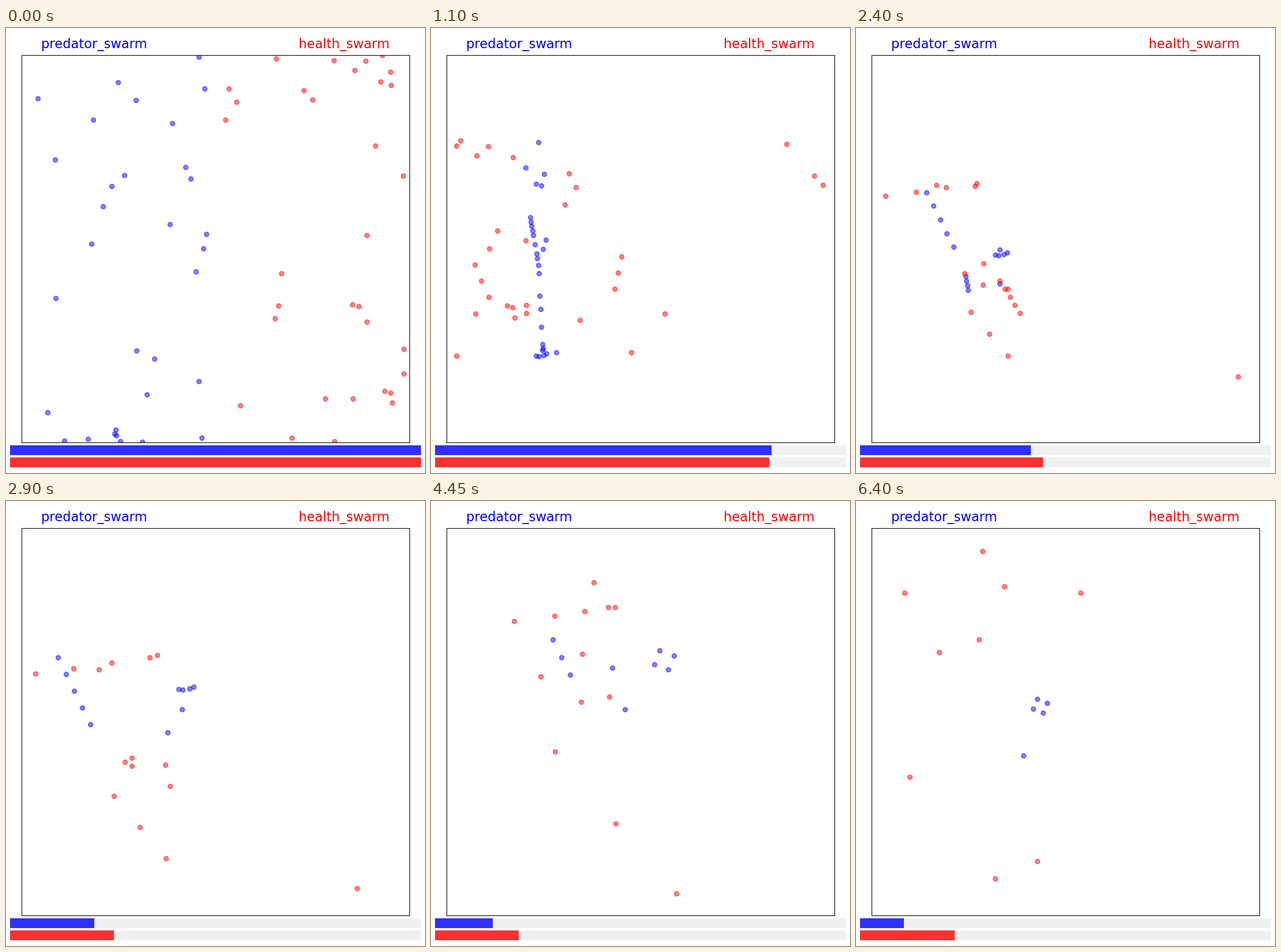
Animation of 726 by 771 pixels, one loop 6.45 s. Source, as a matplotlib script:

```python
import numpy as np
import matplotlib.pyplot as plt
from matplotlib.animation import FuncAnimation
from matplotlib.patches import Rectangle

W, H, DPI = 726, 771, 96
FRAMES, INTERVAL = 129, 50
LEFT, TOP, RIGHT, BOTTOM = 27, 47, 699, 718
ORIGIN = np.array([LEFT, TOP])
SIZE = np.array([RIGHT - LEFT, BOTTOM - TOP])   # opposite walls are joined
VMAX = 6.72                                     # speed limit per axis and step
KEYS = [38, 58, 75, 104, 128]                   # steps of a flock's way points
FOREVER = (FRAMES, FRAMES)


def ring(n, angle):
    a = np.radians(angle) + 2 * np.pi * np.arange(n) / n
    return np.column_stack([np.cos(a), np.sin(a)])


def line(n, angle):
    a = np.radians(angle)
    return np.outer(np.linspace(-1, 1, n), [np.cos(a), np.sin(a)])


def flock(shape, path, deaths=FOREVER):
    """Path holds (x, y, reach) way points; deaths spread over a span of steps."""
    return shape, np.array(path, float), np.linspace(*deaths, len(shape))


def scout(*points, dies=FRAMES):
    return flock(np.zeros((1, 2)), [(x, y, 0) for x, y in points], (dies, dies))


def scatter(rng, n, x0, x1):
    """Random starts, denser near floor and ceiling, ordered top to bottom."""
    x = rng.uniform(x0, x1, n)
    y = TOP + SIZE[1] * (1 - np.cos(np.pi * np.sort(rng.random(n)))) / 2
    return np.column_stack([x, y])


def goals(flocks, step):
    spots = []
    for shape, path, _ in flocks:
        x, y, reach = (np.interp(step, KEYS[:len(path)], c) for c in path.T)
        spots.append(shape * reach + (x, y))
    return np.vstack(spots)


def simulate(flocks, seed, x0, x1):
    """Each particle chases its place in the flock by the shortest way round."""
    deaths = np.concatenate([f[2] for f in flocks])
    pos = scatter(np.random.default_rng(seed), len(deaths), x0, x1)
    frames = []
    for step in range(FRAMES):
        alive = (step < deaths)[:, None]
        frames.append(np.where(alive, pos, np.nan))
        way = (goals(flocks, step + 1) - pos + SIZE / 2) % SIZE - SIZE / 2
        pos = (pos + np.clip(way, -VMAX, VMAX) - ORIGIN) % SIZE + ORIGIN
    return frames


blue = [
    flock(line(5, 64), [(173, 335, 40), (118, 329, 65), (211, 240, 68)], (80, 103)),
    flock(line(21, 80), [(180, 375, 80)], (16, 56)),
    scout((193, 399), (305, 361), (311, 247), (318, 335), dies=108),
    scout((217, 485), (280, 401), (292, 287), (384, 441), (290, 441)),
    flock(ring(4, -24), [(191, 447, 10), (312, 308, 14), (400, 201, 15),
                         (408, 355, 22), (319, 355, 13)]),
]
red = [
    flock(line(4, -8), [(110, 275, 60), (150, 285, 100), (240, 195, 80)], (84, 102)),
    scout((117, 252), (161, 292), (275, 179), (290, 101), (314, -47)),
    scout((150, 282), (262, 267), (306, 168), (308, 202), (257, 148)),
    flock(line(18, 58), [(210, 375, 140)], (18, 59)),
    flock(ring(3, -58), [(205, 400, 35), (214, 452, 8), (231, 352, 8),
                         (244, 256, 90), (172, 162, 88)]),
    scout((250, 447), (276, 457), (304, 343), (314, 335), dies=107),
    flock(line(3, 50), [(230, 495, 30), (232, 565, 70), (292, 509, 100),
                        (350, 612, 230), (241, 654, 230)]),
    scout((44, 537), (-64, 671), (50, 785), (245, 981), (144, 933)),
]
tracks = [simulate(blue, 4, 29, 352), simulate(red, 9, 378, 693)]

# Right end of each health bar over time
BAR_STEPS = [0, 5, 13, 22, 38, 58, 75, 91, 104, 128]
BAR_ENDS = [[719, 719, 692, 590, 453, 153, 184, 96, 90, 83],
            [719, 719, 690, 586, 460, 187, 232, 140, 151, 171]]
BAR_LEFT, BAR_RIGHT, BAR_H = 7, 719, 17

fig = plt.figure(figsize=(W / DPI, H / DPI), dpi=DPI, facecolor="white")

page = fig.add_axes([0, 0, 1, 1])
page.set(xlim=(0, W), ylim=(H, 0))
page.axis("off")

arena = fig.add_axes([LEFT / W, 1 - BOTTOM / H, SIZE[0] / W, SIZE[1] / H])
arena.set(xlim=(LEFT, RIGHT), ylim=(BOTTOM, TOP), xticks=[], yticks=[])

bars, dots = [], []
for color, y, name, x in [("blue", 723, "predator_swarm", 152.5),
                          ("red", 744, "health_swarm", 586)]:
    page.add_patch(Rectangle((BAR_LEFT, y), BAR_RIGHT - BAR_LEFT, BAR_H,
                             fc="#f0f0f0", lw=0))
    bars.append(page.add_patch(Rectangle((BAR_LEFT, y), 0, BAR_H,
                                         fc=color, alpha=0.8, lw=0)))
    page.text(x, 35.5, name, color=color, ha="center", va="baseline",
              family="DejaVu Sans", size=17)
    dots.append(arena.plot([], [], "o", color=color, alpha=0.5, ms=6, mew=1)[0])


def update(step):
    for bar, ends, dot, frames in zip(bars, BAR_ENDS, dots, tracks):
        bar.set_width(round(np.interp(step, BAR_STEPS, ends)) - BAR_LEFT)
        dot.set_data(*frames[step].T)
    return bars + dots


anim = FuncAnimation(fig, update, frames=FRAMES, interval=INTERVAL,
                     init_func=lambda: update(0), repeat=True, repeat_delay=0)
plt.show()
```
